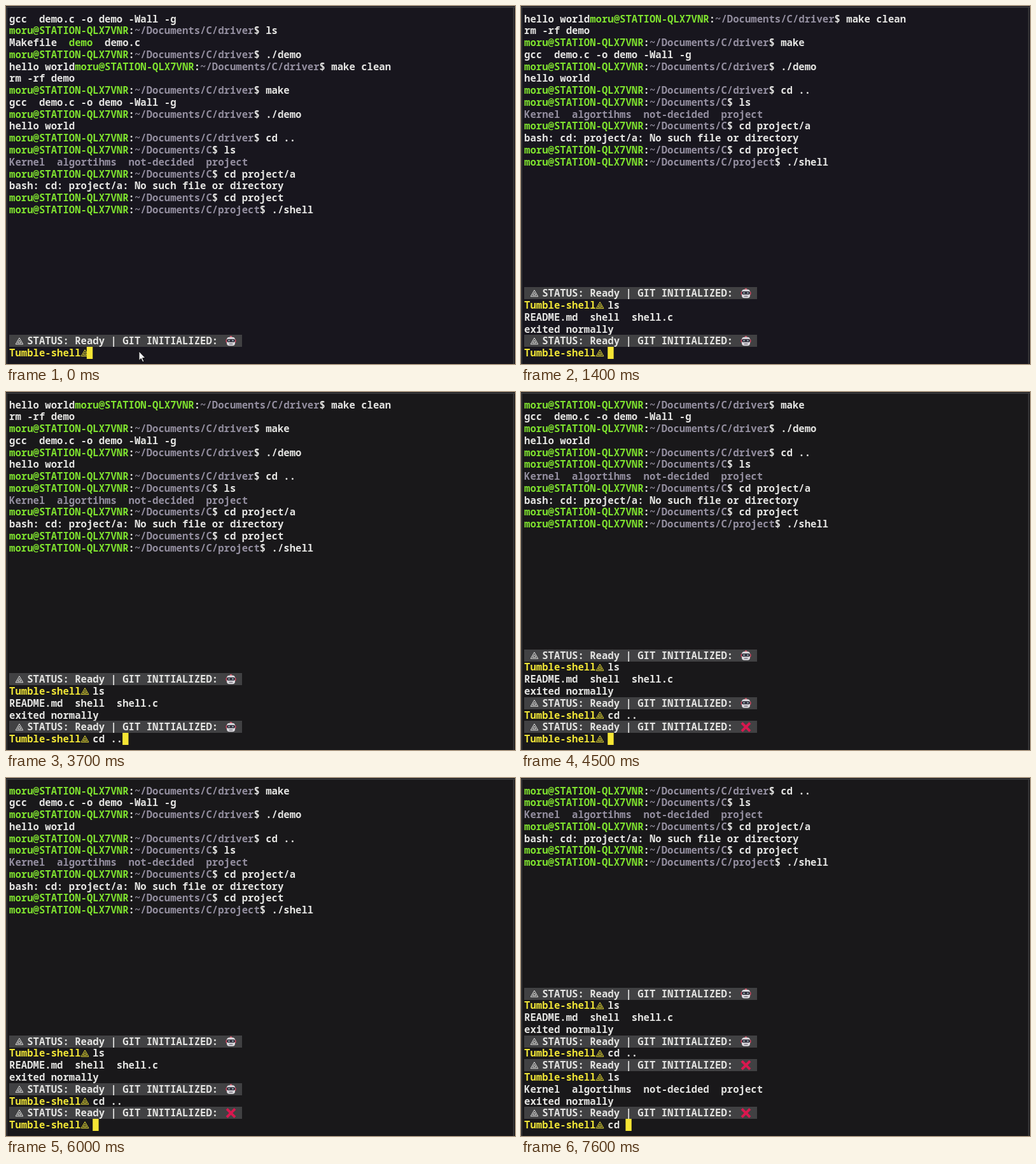
Recreate the animation shown at these times as an HTML page with a canvas. Size 800x563 px, loop 8000 ms.

```html
<!DOCTYPE html>
<html lang="en">
<head>
<meta charset="utf-8">
<title>Terminal session</title>
<style>
html, body { margin: 0; width: 100%; height: 100%; overflow: hidden; background: #18171c; }
canvas { display: block; }
</style>
</head>
<body>
<canvas id="stage" width="800" height="563"></canvas>
<script>
const ctx = document.getElementById('stage').getContext('2d');
const LOOP = 8000, ROWS = 29;
const LEFT = 5, TOP = 10.5, CELL = 9.375, LINE = 18.77;
const WHITE = '#e4e4e2', GREEN = '#7fe22f', GREY = '#948fa0', YELLOW = '#efe436';

// A line is a list of [colour, text] runs, or a status bar / prompt object.
const plain = text => [[WHITE, text]];
const bash = (dir, cmd, before = '') => [
  [WHITE, before], [GREEN, 'moru@STATION-QLX7VNR'], [WHITE, ':'],
  [GREY, '~/Documents/C' + dir], [WHITE, '$ ' + cmd]
];
const status = git => ({ git });
const prompt = typed => ({ typed });
const folders = 'Kernel  algortihms  not-decided  project';

const log = [
  plain('gcc  demo.c -o demo -Wall -g'),
  bash('/driver', 'ls'),
  [[WHITE, 'Makefile  '], [GREEN, 'demo'], [WHITE, '  demo.c']],
  bash('/driver', './demo'),
  bash('/driver', 'make clean', 'hello world'),
  plain('rm -rf demo'),
  bash('/driver', 'make'),
  plain('gcc  demo.c -o demo -Wall -g'),
  bash('/driver', './demo'),
  plain('hello world'),
  bash('/driver', 'cd ..'),
  bash('', 'ls'),
  [[GREY, folders]],
  bash('', 'cd project/a'),
  plain('bash: cd: project/a: No such file or directory'),
  bash('', 'cd project'),
  bash('/project', './shell'),
  ...Array(10).fill([]),
  status(true), prompt('ls'),
  plain('README.md  shell  shell.c'), plain('exited normally'),
  status(true), prompt('cd ..'),
  status(false), prompt('ls'),
  plain(folders), plain('exited normally'),
  status(false), prompt('cd ')
];

// [time, lines printed, characters typed at the last prompt]
const steps = [
  [0, 29, -1], [300, 29, 0], [500, 29, 1], [700, 29, 2],
  [900, 33, 0], [2900, 33, 1], [3200, 33, 2], [3600, 33, 4], [3700, 33, 5],
  [4000, 35, 0], [6100, 35, 1], [6200, 35, 2],
  [6400, 39, 0], [7000, 39, 1], [7200, 39, 2], [7600, 39, 3]
];

const colX = col => LEFT + col * CELL;
const rowY = row => TOP + row * LINE;

function rect(color, x, y, w, h) {
  ctx.fillStyle = color;
  ctx.fillRect(x, y, w, h);
}

function path(points, close) {
  ctx.beginPath();
  points.forEach(([x, y]) => ctx.lineTo(x, y));
  if (close) ctx.closePath();
}

// Each glyph sits in its own terminal cell.
function write(color, text, col, y) {
  ctx.fillStyle = color;
  [...text].forEach((c, i) => ctx.fillText(c, colX(col + i), y + 15));
}

function triangle(color, col, y) {
  const x = colX(col) + 6.6;
  ctx.strokeStyle = color;
  ctx.lineWidth = 1;
  path([[x, y + 4.6], [x + 5.8, y + 14.6], [x - 5.8, y + 14.6]], true);
  ctx.stroke();
  path([[x, y + 8.4], [x + 2.7, y + 12.6], [x - 2.7, y + 12.6]], true);
  ctx.stroke();
}

function box(color, x, y, w, h, r) {
  ctx.fillStyle = color;
  ctx.beginPath();
  ctx.roundRect(x, y, w, h, r);
  ctx.fill();
}

function robot(x, y) {
  box('#c8435c', x - 8, y - 3, 16, 6, 2);
  box('#d35a6c', x - 2, y - 8, 4, 4, 2);
  box('#dddbe0', x - 6.5, y - 6, 13, 13.5, 4);
  box('#34333f', x - 6.5, y - 3, 13, 5, 2);
  box('#c9e7ec', x - 4, y - 1.5, 2, 2, 1);
  box('#c9e7ec', x + 2, y - 1.5, 2, 2, 1);
  box('#77727d', x - 3, y + 4, 6, 1.5, 0.5);
}

function cross(x, y) {
  ctx.strokeStyle = '#d9184f';
  ctx.lineWidth = 4;
  for (const s of [1, -1]) {
    path([[x - 6.5, y - 6.5 * s], [x + 6.5, y + 6.5 * s]]);
    ctx.stroke();
  }
}

function drawStatus(git, y) {
  rect('#414143', LEFT, Math.round(y), 366, 19);
  triangle(WHITE, 1, y);
  write(WHITE, 'STATUS: Ready | GIT INITIALIZED:', 3, y);
  (git ? robot : cross)(353.5, y + 9.5);
}

function drawPrompt(typed, y) {
  write(YELLOW, 'Tumble-shell', 0, y);
  triangle(YELLOW, 12, y);
  write(WHITE, typed, 14, y);
}

function drawMouse(x, y) {
  path([[0, 0], [0, 14.5], [3.3, 11.5], [5.8, 17], [8, 16], [5.6, 10.7], [10, 10.5]]
    .map(([a, b]) => [x + a, y + b]), true);
  ctx.fillStyle = '#f2f2f2';
  ctx.strokeStyle = '#0c0c10';
  ctx.lineWidth = 1;
  ctx.fill();
  ctx.stroke();
}

function draw(t) {
  const [, count, typed] = steps.findLast(s => s[0] <= t);
  rect(t < 2000 ? '#18161e' : '#19181a', 0, 0, 800, 563);
  rect('#434345', 0, 1, 800, 1.5);
  rect('#3c3c3e', 0.5, 1, 1.5, 562);
  rect('#3c3c3e', 797, 1, 1.5, 562);

  ctx.font = '600 15.625px "Noto Sans Mono", "DejaVu Sans Mono", monospace';
  for (let row = 0; row < ROWS; row++) {
    const line = log[count - ROWS + row], y = rowY(row);
    if ('git' in line) drawStatus(line.git, y);
    else if ('typed' in line) {
      const last = row === ROWS - 1;
      drawPrompt(last ? line.typed.slice(0, Math.max(typed, 0)) : line.typed, y);
      if (last) rect('#f5e534', colX(14 + typed), Math.round(y), CELL, 19);
    } else {
      let col = 0;
      for (const [color, text] of line) {
        write(color, text, col, y);
        col += text.length;
      }
    }
  }
  if (t < 300) drawMouse(209, 543);
}

const start = performance.now();
function tick() {
  draw((performance.now() - start) % LOOP);
  requestAnimationFrame(tick);
}
tick();
</script>
</body>
</html>
```
